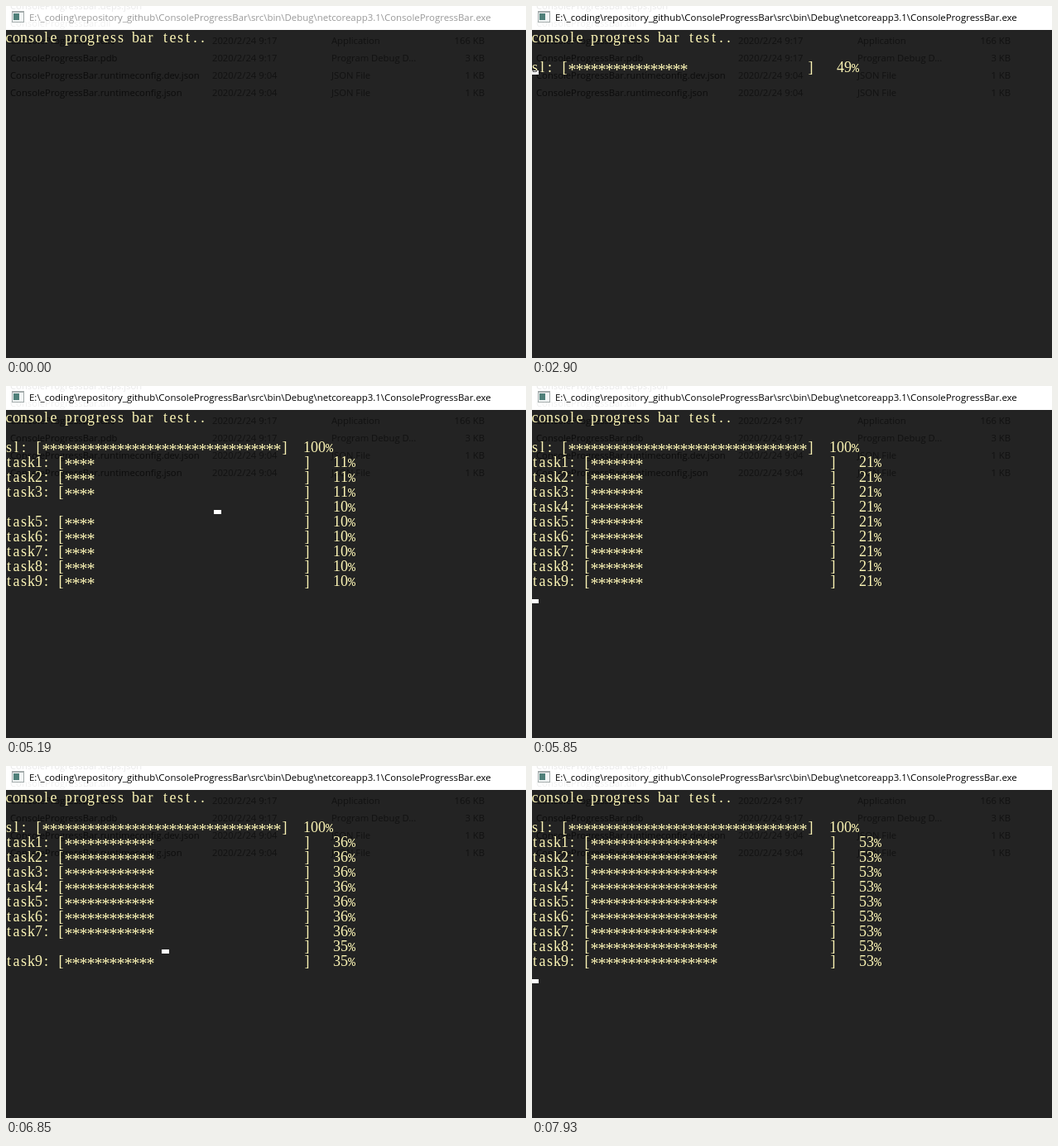
Animation, 628 px wide and 426 px high, one loop 7990 ms. Source, as an HTML page with a canvas:

```html
<!DOCTYPE html>
<html lang="en">
<head>
<meta charset="utf-8">
<title>Console progress bar</title>
<style>
  html, body { margin: 0; width: 100%; height: 100%; overflow: hidden; background: #232323; }
  canvas { display: block; }
</style>
</head>
<body>
<canvas id="stage" width="628" height="426"></canvas>
<script>
const ctx = document.getElementById('stage').getContext('2d', { alpha: false });
const LOOP = 7990, CELL = 9, LINE = 18, LEFT = -1, TOP = 29, BAR = 32;
const BACK = '#232323', INK = '#fdf6b6';
const SERIF = '18px "Liberation Serif", serif';
// Glyphs that need another font or baseline than the rest: [font, baseline]
const GLYPHS = {
  '*': ['20px "Liberation Serif", serif', 19],
  '%': ['15px "Liberation Mono", monospace', 15],
};
const APP = 'ConsoleProgressBar';
const PATH = `E:\\_coding\\repository_github\\${APP}\\src\\bin\\Debug\\netcoreapp3.1\\${APP}.exe`;
const FILES = [
  ['.exe', '9:17', 'Application', '166 KB'],
  ['.pdb', '9:17', 'Program Debug D...', '3 KB'],
  ['.runtimeconfig.dev.json', '9:04', 'JSON File', '1 KB'],
  ['.runtimeconfig.json', '9:04', 'JSON File', '1 KB'],
];
// The screen refreshes every 60 ms, counted anew from each of these times.
const REFRESH = [1340, 4230, 5890, 6710, 6810, 6850];
// [time, passes over the nine tasks]
const PASSES = [[4230, 0.95], [5190, 11.36], [5850, 21.95], [6850, 36.7455], [7930, 53.95]];

function text(str, x, y, color, font, align = 'left') {
  ctx.font = font;
  ctx.fillStyle = color;
  ctx.textAlign = align;
  ctx.fillText(str, x, y);
}

function box(x, y, w, h, color) {
  ctx.fillStyle = color;
  ctx.fillRect(x, y, w, h);
}

function drawWindow(active) {
  const small = '11.25px "Open Sans", sans-serif';
  box(0, 0, 628, 426, BACK);
  box(0, 0, 628, TOP, '#fff');
  text(APP + '.deps.json', 5, 4, '#e9e9e9', small);
  text(APP + '.dll', 5, 25, '#f0f0f0', small);
  FILES.forEach(([ext, time, type, size], i) => {
    const y = 46 + 21 * i;
    text(APP + ext, 5, y, '#0c0c0c', small);
    text('2020/2/24 ' + time, 249, y, '#121212', small);
    text(type, 393, y, '#121212', small);
    text(size, 578, y, '#121212', small, 'right');
  });
  box(7, 6, 15, 14, '#a3abab');
  box(8, 8, 13, 11, '#f2f5f5');
  box(9, 9, 7, 8, '#4f8079');
  text(PATH, 28, 18, active ? '#000' : '#999', '11.43px "Open Sans", sans-serif');
}

function drawRows(rows, color) {
  rows.forEach((row, r) => [...row].forEach((ch, c) => {
    const [font, baseline] = GLYPHS[ch] || [SERIF, 15];
    text(ch, LEFT + (c + 0.5) * CELL, TOP + r * LINE + baseline, color, font, 'center');
  }));
}

// The cursor is a white block that turns the text below it dark.
function drawCursor(rows, row, col) {
  const area = [LEFT + col * CELL, TOP + (row + 1) * LINE - 5, CELL, 5];
  ctx.save();
  ctx.beginPath();
  ctx.rect(...area);
  ctx.clip();
  box(...area, '#fff');
  drawRows(rows, BACK);
  ctx.restore();
}

function bar(name, percent) {
  const stars = '*'.repeat(Math.ceil(percent * BAR / 100));
  return `${name}: [${stars.padEnd(BAR)}]  ${String(percent).padStart(3)}%`;
}

function refreshTime(t) {
  const start = REFRESH.filter(s => s <= t).pop();
  return start + 60 * Math.floor((t - start) / 60);
}

function passesAt(t) {
  let i = 1;
  while (i < PASSES.length - 1 && t > PASSES[i][0]) i++;
  const [t0, p0] = PASSES[i - 1], [t1, p1] = PASSES[i];
  return p0 + (p1 - p0) * (t - t0) / (t1 - t0);
}

// Each pass wipes and rewrites the tasks in turn, then rests below them.
function addTasks(rows, t) {
  const passes = passesAt(t), done = Math.floor(passes);
  const slot = (passes - done) * 10, current = Math.floor(slot);
  const wiped = Math.floor((slot - current) * 47);
  for (let i = 0; i < 9; i++) {
    const line = bar('task' + (i + 1), i < current ? done : Math.max(0, done - 1));
    rows.push(i === current ? ' '.repeat(wiped) + line.slice(wiped) : line);
  }
  return current < 9 ? [3 + current, wiped] : [12, 0];
}

function render(t) {
  const rows = ['console progress bar test..'];
  let cursor = t >= 840 ? [1, 0] : null;
  if (t >= 4230) {
    rows.push('', bar('sl', 100));
    cursor = addTasks(rows, refreshTime(t));
  } else if (t >= 1340) {
    const percent = t >= 3920 ? 92 : Math.max(0, Math.floor((refreshTime(t) - 1378) / 30.5));
    rows.push('', bar('sl', percent));
    cursor = [2, 0];
  }
  drawWindow(t >= 310);
  drawRows(rows, INK);
  if (cursor) drawCursor(rows, ...cursor);
}

function frame() {
  render(performance.now() % LOOP);
  requestAnimationFrame(frame);
}
frame();
</script>
</body>
</html>
```
